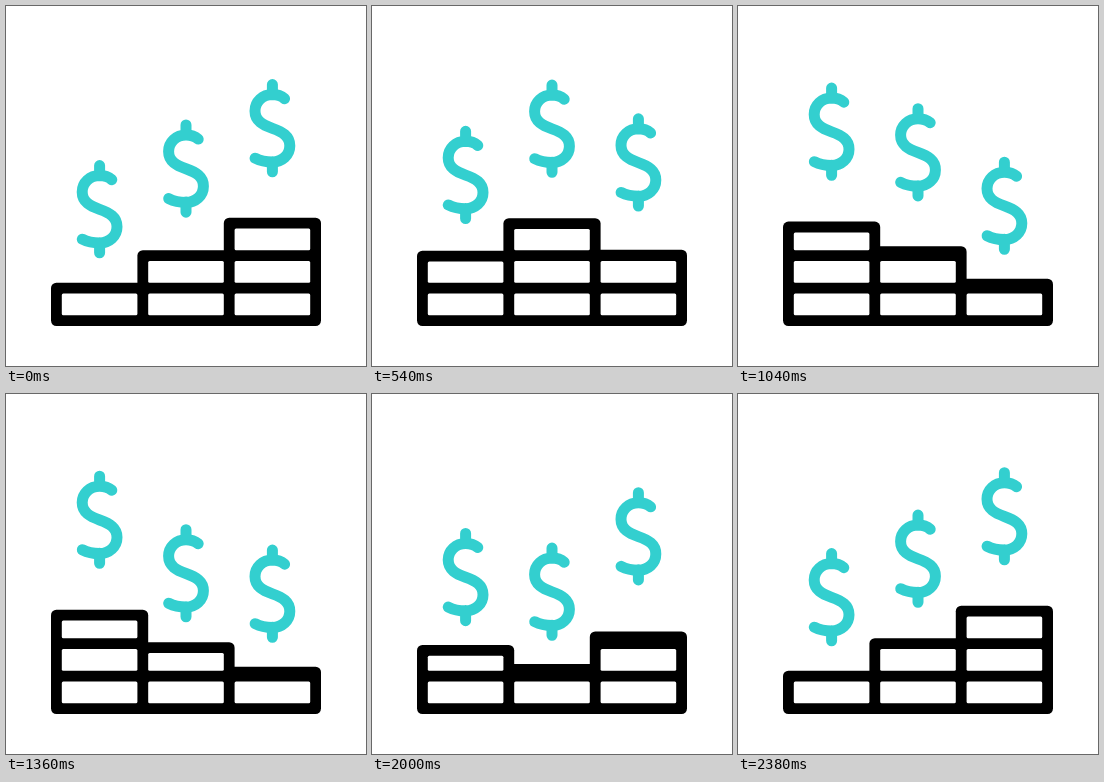
An HTML page that plays this animation: 360x360 px, repeating every 2400 ms.

```html
<!DOCTYPE html>
<html lang="en">
<head>
<meta charset="utf-8">
<title>Growing stacks</title>
<style>
  html, body { margin: 0; width: 100%; height: 100%; overflow: hidden; background: #fff; }
  svg { display: block; width: 100vw; height: 100vh; }
  .coin { fill: none; stroke: #33cfcf; stroke-width: 11; stroke-linecap: round; stroke-linejoin: round; }
</style>
</head>
<body>
<svg viewBox="0 0 360 360">
  <defs>
    <path id="dollar" class="coin" d="M0 5.4V15.5M0 82.5V92.6M12.2 19.5C9 16.8 4.6 15.4 0 15.4
      C-9.8 15.4-17.4 22.6-17.4 31.8C-17.4 42-9 46 0 49.2C10 52.8 17.4 56.8 17.4 66.6
      C17.4 76 9.6 82.8 0 82.8C-6 82.8-12.6 81.4-17.3 79"/>
  </defs>
  <g id="frames"></g>
  <g id="gaps" fill="#fff"></g>
  <g id="coins"></g>
</svg>
<script>
const LOOP = 2400, LINE = 10.8, HALF = LINE / 2;
const LEFT = 50.4, WIDTH = 86.4, BASE = 314.6, ROW = 32.5;
const COIN_MID = 113.7, COIN_SWING = 40.5;

// Stack height in rows at each quarter of the loop, and phase of its coin.
const stacks = [
  { rows: [1, 2, 3, 2], phase: 0.5 },
  { rows: [2, 3, 2, 1], phase: 0.75 },
  { rows: [3, 2, 1, 2], phase: 0 }
];

function add(parent, tag, attrs) {
  const el = document.createElementNS('http://www.w3.org/2000/svg', tag);
  set(el, attrs);
  return document.getElementById(parent).appendChild(el);
}

function set(el, attrs) {
  for (const key in attrs) el.setAttribute(key, attrs[key]);
}

// cubic-bezier(.5, 0, .5, 1)
function ease(x) {
  let lo = 0, hi = 1;
  for (let i = 0; i < 24; i++) {
    const s = (lo + hi) / 2;
    if (1.5 * s - 1.5 * s * s + s * s * s < x) lo = s; else hi = s;
  }
  return lo * lo * (3 - 2 * lo);
}

stacks.forEach((stack, i) => {
  stack.x = LEFT + i * WIDTH;
  stack.frame = add('frames', 'rect', { x: stack.x - HALF, width: WIDTH + LINE, rx: HALF });
  stack.gaps = [0, 1, 2].map(() =>
    add('gaps', 'rect', { x: stack.x + HALF, width: WIDTH - LINE, rx: 1.5 }));
  stack.coin = add('coins', 'use', { href: '#dollar' });
});

function draw(time) {
  const p = time % LOOP / LOOP;
  const quarter = Math.floor(p * 4);
  const k = ease(p * 4 - quarter);

  for (const { x, rows, phase, frame, gaps, coin } of stacks) {
    const from = rows[quarter], to = rows[(quarter + 1) % 4];
    const level = from + (to - from) * k;
    const top = BASE - level * ROW;
    set(frame, { y: top - HALF, height: level * ROW + LINE });

    gaps.forEach((gap, row) => {
      const floor = BASE - row * ROW - HALF;
      const ceil = Math.max(top, BASE - (row + 1) * ROW) + HALF;
      set(gap, { y: ceil, height: Math.max(0, floor - ceil) });
    });

    const y = COIN_MID - COIN_SWING * Math.cos(2 * Math.PI * (p + phase));
    set(coin, { transform: `translate(${x + WIDTH / 2} ${y})` });
  }
}

const start = performance.now();
function tick() {
  draw(performance.now() - start);
  requestAnimationFrame(tick);
}
draw(0);
requestAnimationFrame(tick);
</script>
</body>
</html>
```
